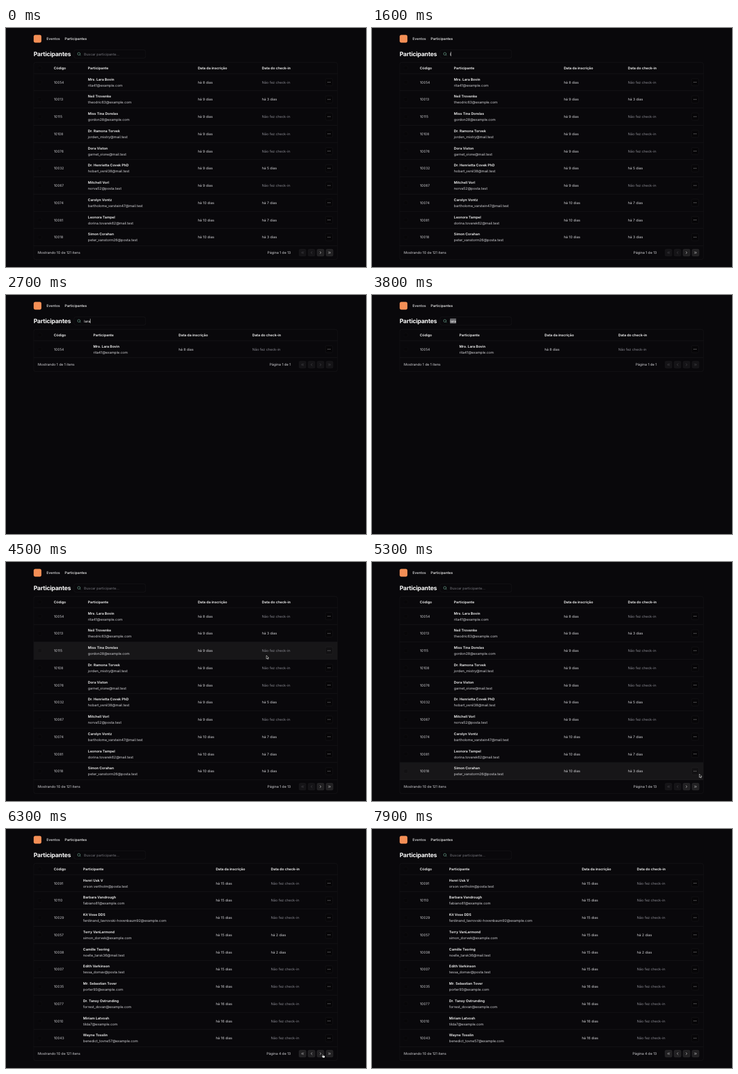
An HTML page with a canvas for the animation above (8 s loop, 600 by 399 pixels).

```html
<!DOCTYPE html>
<html lang="pt-BR">
<head>
<meta charset="utf-8">
<title>Participantes</title>
<style>
  html, body { margin: 0; width: 100%; height: 100%; overflow: hidden; background: #09080b; }
  canvas { display: block; width: 600px; height: 399px; }
</style>
</head>
<body>
<canvas id="stage"></canvas>
<script>
const W = 600, H = 399, LOOP = 8000;
const LEFT = 45.9, TOP = -0.35, SCALE = 600 / 1440; // layout units are CSS px of a 1440 px wide page
const WIDE = 1216, ROW = 69, HEAD_TOP = 138, ROWS_TOP = 184;

const canvas = document.getElementById('stage');
const ctx = canvas.getContext('2d');
const dpr = window.devicePixelRatio || 1;
canvas.width = W * dpr;
canvas.height = H * dpr;

const hosts = { a: 'example.com', b: 'mail.test', c: 'posta.test' };

// code, name, mailbox, host, days since sign-up, check-in
const people = `
10054|Mrs. Lara Bovin|rita41|a|8|
10013|Neil Trovenke|theodric63|a|9|3 dias
10115|Miss Tina Dorelas|gordon28|a|9|
10108|Dr. Ramona Torvek|jorden_mistry|b|9|
10076|Dora Viston|garnet_vione|b|9|
10032|Dr. Henrietta Covek PhD|hobart_venil38|b|9|5 dias
10067|Mitchell Vorl|norva52|c|9|
10074|Carolyn Vontz|bartholome_varstein47|b|10|7 dias
10081|Leonora Tampel|dorina.tovarek62|b|10|7 dias
10018|Simon Corahan|peter_vanstorm26|c|10|3 dias
10048|Martin Dorovinski|tobin34|b|10|
10031|Vivien Tossel|clifton_odureva|c|10|3 dias
10045|Florentine Larmsted|gregory.vostane74|b|11|5 dias
10109|Nola Viston|deshorn.corahan|c|11|9 horas
10044|Winfred Slatova|corinne6|b|12|5 dias
10072|Rosanna Tovik|ivy72|b|12|2 dias
10020|Dennis Corver|sabina64|b|12|7 dias
10095|Grant Vormeler|monica.brund-taverwitz53|a|12|
10094|Peter Vonsen|eno.tamm83|c|12|4 dias
10117|Bo Travinski|gaston.verdolist-hovenbaum25|a|13|4 dias
10062|Ivor Dansett|renata19|b|13|
10025|Miss Greta Povan|tadeo_mirv44|a|13|6 dias
10099|Oscar Venturon|pilar.sorvin|c|13|
10003|Judith Marrowen|desmond67|b|14|2 dias
10088|Dr. Ruben Tasker|ottis_varn21|b|14|
10051|Norma Hovestad|bruna.kestov|a|14|4 dias
10112|Victor Drumsen|marcos35|c|14|
10039|Sonia Perevost|emeric_toff|b|14|
10083|Hugo Strandov|vera.mondas88|a|15|3 dias
10016|Ingrid Bosmer|otavio5|b|15|
10091|Henri Usk V|orson.vertholm|c|15|
10110|Barbara Vandrough|fabiano81|a|15|
10029|Kit Vose DDS|ferdinand_tavrovski-hovenbaum92|a|15|
10057|Terry VanLarmond|simon_dorvek|a|15|2 dias
10008|Camille Teoring|noelle_tarsk36|b|15|2 dias
10007|Edith Varkinson|tessa_domav|c|15|
10035|Mr. Sebastian Tover|porter93|a|16|
10077|Dr. Tansy Ostrunding|forrest_dovan|a|16|
10010|Miriam Latvosh|tilda7|a|16|
10043|Wayne Tosslin|benedict_tovne57|a|16|
10106|Dr. Lavinia Torse DVM|mateo.drost46|b|20|19 horas
10119|Lamar Postvig|tamsin_corvathian58|b|22|
10070|Mrs. Clarice Vodner PhD|hamish_vione|b|23|
`.trim().split('\n').map(line => {
  const [code, name, user, host, days, check] = line.split('|');
  return { code, name, mail: user + '@' + hosts[host], days, check };
});

const page = (n, cols) => ({ rows: people.slice(n * 10 - 10, n * 10), total: 121, cols });
const search = (query, total, cols) => ({
  rows: people.filter(p => p.name.toLowerCase().includes(query)).slice(0, 10), total, cols
});

const first = page(1, [217.7, 657, 913.7]);
const lists = [
  [0, first],
  [1700, search('l', 62, [218, 655, 912])],
  [2300, search('la', 13, [222.5, 642.5, 906.5])],
  [2600, search('lar', 4, [228, 625, 897])],
  [2700, search('lara', 1, [239, 580, 875])],
  [3900, first],
  [5800, page(2, [205.7, 705, 937.7])],
  [5900, page(3, [210, 690, 930])],
  [6300, page(4, [198.5, 729, 949.7])]
];
const pageNumber = [[0, 1], [5700, 2], [5900, 3], [6300, 4]];
const typed = [[0, ''], [1500, 'l'], [2100, 'la'], [2500, 'lar'], [2600, 'lara'], [3900, '']];
const caret = [[0, 0], [100, 1], [500, 0], [1000, 1], [3100, 0], [3900, 1], [4200, 0]];
const SELECT = [3400, 3900];

// pointer tip in stage pixels
const path = [[4000, 190, 62], [4500, 434, 156], [4800, 564, 311], [5200, 549, 350], [5600, 527.3, 375.6], [6600, 527.3, 375.6]];

const at = (track, t) => track.filter(k => k[0] <= t).pop()[1];

function pointerAt(t) {
  const i = path.findIndex((k, n) => n && t >= path[n - 1][0] && t < k[0]);
  if (i < 0) return null;
  const [t0, x0, y0] = path[i - 1], [t1, x1, y1] = path[i];
  const u = (t - t0) / (t1 - t0), e = u * u * (3 - 2 * u);
  return { x: x0 + (x1 - x0) * e, y: y0 + (y1 - y0) * e };
}

const setFont = (size, weight) => { ctx.font = `${weight} ${size}px Inter, sans-serif`; };

function text(str, x, y, color = '#d4d4d8', weight = 400, size = 14, align = 'left') {
  setFont(size, weight);
  ctx.textAlign = align;
  ctx.fillStyle = color;
  ctx.fillText(str, x, y + size * 0.364);
}

function box(x, y, w, h, r, fill, stroke = 'rgba(255,255,255,.1)') {
  ctx.beginPath();
  ctx.roundRect(x + 0.5, y + 0.5, w - 1, h - 1, r);
  if (fill) { ctx.fillStyle = fill; ctx.fill(); }
  if (stroke) { ctx.strokeStyle = stroke; ctx.lineWidth = 1; ctx.stroke(); }
}

function rule(y) {
  ctx.fillStyle = 'rgba(255,255,255,.1)';
  ctx.fillRect(1, y - 1, WIDE - 2, 1);
}

const icons = {
  search: 'M19 11a8 8 0 1 1-16 0a8 8 0 1 1 16 0M21 21l-4.3-4.3',
  more: 'M4.5 12h1M11.5 12h1M18.5 12h1',
  first: 'M11 17l-5-5 5-5M18 17l-5-5 5-5',
  prev: 'M15 18l-6-6 6-6',
  next: 'M9 18l6-6-6-6',
  last: 'M6 17l5-5-5-5M13 17l5-5-5-5'
};
for (const k in icons) icons[k] = new Path2D(icons[k]);

function icon(name, x, y, color) {
  ctx.save();
  ctx.translate(x, y);
  ctx.scale(16 / 24, 16 / 24);
  ctx.lineWidth = 2;
  ctx.lineCap = ctx.lineJoin = 'round';
  ctx.strokeStyle = color;
  ctx.stroke(icons[name]);
  ctx.restore();
}

function button(name, x, y, fill, enabled = true) {
  ctx.globalAlpha = enabled ? 1 : 0.5;
  box(x, y, 30, 30, 6, fill);
  icon(name, x + 7, y + 7, enabled ? '#fafafa' : '#a1a1aa');
  ctx.globalAlpha = 1;
}

const checkbox = y => box(17, y - 8, 16, 16, 4, 'rgba(0,0,0,.2)', 'rgba(255,255,255,.06)');

function drawTop(t) {
  box(0, 28, 32, 32, 7, '#f48f56', null);
  text('Eventos', 52, 44, '#e4e4e7', 500);
  text('Participantes', 125, 44, '#fafafa', 500);

  ctx.letterSpacing = '-0.5px';
  text('Participantes', 0, 105, '#fafafa', 700, 24);
  ctx.letterSpacing = '0px';
  box(161, 88, 288, 34, 8);
  icon('search', 174, 97, '#86cdb0');

  const value = at(typed, t), x = 202;
  setFont(14, 400);
  const width = ctx.measureText(value).width;
  const selected = t >= SELECT[0] && t < SELECT[1];
  if (selected) {
    ctx.fillStyle = '#66666a';
    ctx.fillRect(x, 95, width, 20);
  }
  if (value) text(value, x, 105, '#fafafa');
  else text('Buscar participante...', x, 105, '#75757c');
  if (!selected && at(caret, t)) {
    ctx.fillStyle = '#fafafa';
    ctx.fillRect(x + width, 96, 1.4, 18);
  }
}

function drawTable(t, pointer) {
  const { rows, total, cols } = at(lists, t);
  const [nameX, joinX, checkX] = cols;
  const end = ROWS_TOP + rows.length * ROW;

  box(0, HEAD_TOP, WIDE, end + 55 - HEAD_TOP, 8);
  checkbox(161);
  text('Código', 81, 161, '#fafafa', 600);
  text('Participante', nameX, 161, '#fafafa', 600);
  text('Data da inscrição', joinX, 161, '#fafafa', 600);
  text('Data do check-in', checkX, 161, '#fafafa', 600);
  rule(ROWS_TOP);

  const inside = pointer && pointer.x > LEFT && pointer.x < LEFT + WIDE * SCALE;
  const hovered = inside ? Math.floor(((pointer.y - TOP) / SCALE - ROWS_TOP) / ROW) : -1;

  rows.forEach((p, i) => {
    const y = ROWS_TOP + i * ROW, mid = y + 34;
    if (i === hovered) {
      ctx.fillStyle = 'rgba(255,255,255,.055)';
      ctx.fillRect(1, y, WIDE - 2, ROW);
    }
    checkbox(mid);
    text(p.code, 81, mid, '#c4c4c8');
    text(p.name, nameX, y + 22, '#fafafa', 600);
    text(p.mail, nameX, y + 46);
    text(`há ${p.days} dias`, joinX, mid);
    if (p.check) text('há ' + p.check, checkX, mid);
    else text('Não fez check-in', checkX, mid, '#8a8a92');
    button('more', 1167, mid - 15, 'rgba(0,0,0,.2)');
    rule(y + ROW);
  });

  const mid = end + 27, n = at(pageNumber, t), pages = Math.ceil(total / 10);
  text(`Mostrando ${rows.length} de ${total} itens`, 17, mid);
  text(`Página ${n} de ${pages}`, 1029, mid, '#d4d4d8', 400, 14, 'right');
  ['first', 'prev', 'next', 'last'].forEach((name, i) =>
    button(name, 1061 + i * 36, mid - 15, 'rgba(255,255,255,.1)', i < 2 ? n > 1 : n < pages));
}

const arrow = new Path2D('M0 0V5.6L1.4 4.4L2.3 6.4L3.2 6L2.3 4.1H4.1Z');
const hand = new Path2D('M0 .6Q.6-.3 1.2 .6V2.5L3.8 3Q4.6 3.2 4.4 4.2L3.8 6.4H.7L-1.2 3.9Q-1.1 3 0 3.7Z');

function drawPointer({ x, y }) {
  const overButton = y > 369 && x < 546;
  ctx.save();
  ctx.translate(x, y);
  ctx.lineJoin = 'round';
  ctx.lineWidth = 0.6;
  ctx.fillStyle = overButton ? '#fff' : '#000';
  ctx.strokeStyle = overButton ? '#000' : '#fff';
  const shape = overButton ? hand : arrow;
  ctx.fill(shape);
  ctx.stroke(shape);
  ctx.restore();
}

function draw(t) {
  const pointer = pointerAt(t);
  ctx.setTransform(dpr, 0, 0, dpr, 0, 0);
  ctx.textRendering = 'geometricPrecision';
  ctx.fillStyle = '#09080b';
  ctx.fillRect(0, 0, W, H);

  ctx.save();
  ctx.translate(LEFT, TOP);
  ctx.scale(SCALE, SCALE);
  drawTop(t);
  drawTable(t, pointer);
  ctx.restore();

  if (pointer) drawPointer(pointer);
}

const start = performance.now();
function tick() {
  draw((performance.now() - start) % LOOP);
  requestAnimationFrame(tick);
}
tick();
</script>
</body>
</html>
```
